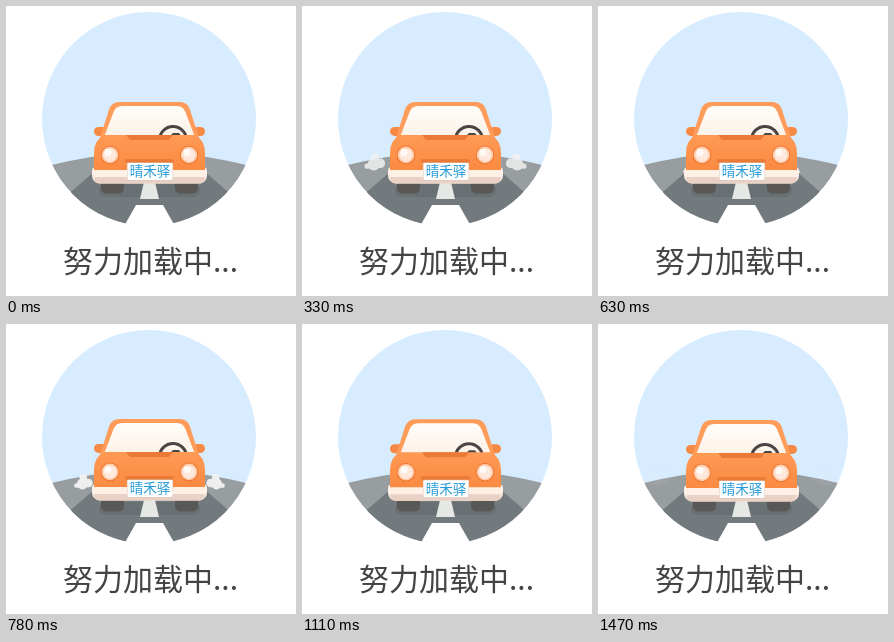
An HTML page with a canvas that plays this animation: 290x290 px, repeating every 1500 ms.

```html
<!DOCTYPE html>
<html lang="zh">
<head>
<meta charset="utf-8">
<style>
html, body { margin: 0; width: 100%; height: 100%; overflow: hidden; background: #fff; }
canvas { display: block; width: 290px; height: 290px; }
</style>
</head>
<body>
<canvas id="stage" width="290" height="290"></canvas>
<script>
const ctx = document.getElementById('stage').getContext('2d');
const TAU = Math.PI * 2;
const LOOP = 1500, PUFF_PERIOD = 500, BOB_PERIOD = 300;
const CENTER = 143.5;
const FONT = '"Noto Sans CJK SC", "Noto Sans CJK", "Noto Sans", sans-serif';

function fillPath(color, trace) {
  ctx.beginPath();
  trace();
  ctx.fillStyle = color;
  ctx.fill();
}

const poly = (color, ...pts) => fillPath(color, () => {
  pts.forEach(([x, y]) => ctx.lineTo(x, y));
  ctx.closePath();
});
const box = (color, x, y, w, h, r) => fillPath(color, () => ctx.roundRect(x, y, w, h, r));
const disc = (color, x, y, rx, ry = rx) => fillPath(color, () => ctx.ellipse(x, y, rx, ry, 0, 0, TAU));

function vertical(y0, y1, top, bottom) {
  const g = ctx.createLinearGradient(0, y0, 0, y1);
  g.addColorStop(0, top);
  g.addColorStop(1, bottom);
  return g;
}

function label(text, x, y, font, color, align) {
  ctx.font = `${font} ${FONT}`;
  ctx.fillStyle = color;
  ctx.textAlign = align;
  ctx.fillText(text, x, y);
}

// Runs a drawing for the left half, then mirrored for the right half.
function bothSides(draw) {
  draw();
  ctx.save();
  ctx.translate(CENTER * 2, 0);
  ctx.scale(-1, 1);
  draw();
  ctx.restore();
}

// Exhaust drifts outward and up, grows and fades.
function puff(phase) {
  const age = phase - 0.46;
  const scale = 0.75 + age;
  const alpha = 1 - (Math.max(0, age) / 0.5) ** 2;
  if (scale <= 0 || alpha <= 0) return;
  ctx.save();
  ctx.globalAlpha = alpha;
  ctx.translate(82 - age * 46, 160 - age * 18);
  ctx.scale(scale, scale);
  fillPath('#f1f1f1', () => {
    for (const [x, y, r] of [[-1, 2, 6.5], [6, 1, 5], [0, -5, 4.5], [-8, 4, 2.8]]) {
      ctx.moveTo(x + r, y);
      ctx.arc(x, y, r, 0, TAU);
    }
  });
  ctx.restore();
}

function scene(phase) {
  ctx.save();
  ctx.beginPath();
  ctx.arc(143, 113, 107, 0, TAU);
  ctx.clip();
  ctx.fillStyle = '#d7ecff';
  ctx.fillRect(30, 0, 230, 225);
  fillPath('#989da0', () => {
    ctx.moveTo(30, 163);
    ctx.quadraticCurveTo(143, 131, 256, 163);
    ctx.lineTo(256, 225);
    ctx.lineTo(30, 225);
  });
  poly('#737a7d', [105, 151], [182, 151], [267, 225], [20, 225]);
  box('#697073', 93, 178, 101, 13, 6);
  poly('#e6e8e6', [138, 176], [149, 176], [153, 193], [134, 193]);
  ctx.restore();
  poly('#fff', [130, 199], [157, 199], [170, 222], [117, 222]);
  bothSides(() => puff(phase));
}

function headlight(x, y) {
  disc('#ec7430', x, y, 9.3);
  disc('#ffcdac', x, y, 8.3);
  disc('#ffe9dc', x, y, 6.5);
  disc('#fffaf6', x - 2, y - 2.5, 3.5);
}

function cabin(color, top, bottom, xTop, xBottom, r) {
  const mirror = x => CENTER * 2 - x;
  fillPath(color, () => {
    ctx.moveTo(xBottom, bottom);
    ctx.lineTo(xTop - r * 0.4, top + r);
    ctx.quadraticCurveTo(xTop, top, xTop + r, top);
    ctx.lineTo(mirror(xTop + r), top);
    ctx.quadraticCurveTo(mirror(xTop), top, mirror(xTop - r * 0.4), top + r);
    ctx.lineTo(mirror(xBottom), bottom);
    ctx.closePath();
  });
}

function body() {
  const right = CENTER * 2;
  fillPath(vertical(129, 164, '#ff9a54', '#fb8a42'), () => {
    ctx.moveTo(98, 129);
    ctx.lineTo(right - 98, 129);
    ctx.quadraticCurveTo(right - 88, 134, right - 88, 147);
    ctx.lineTo(right - 88, 164);
    ctx.lineTo(88, 164);
    ctx.lineTo(88, 147);
    ctx.quadraticCurveTo(88, 134, 98, 129);
  });
}

function car(lift) {
  bothSides(() => box('#595856', 95, 170, 23, 17.5, 5));
  ctx.save();
  ctx.translate(0, -lift);
  bothSides(() => box('#f68a45', 88, 121, 13, 9, 4.5));
  cabin('#ff9c5a', 96, 132, 106, 94, 7);
  cabin(vertical(100, 130, '#fffdfa', '#fdf2e8'), 100, 131, 110, 98, 6);

  ctx.strokeStyle = '#494545';
  ctx.lineWidth = 3;
  ctx.beginPath();
  ctx.arc(167, 134, 13.5, Math.PI, TAU);
  ctx.stroke();
  poly('#494545', [163, 131], [167, 127], [173, 127], [176, 131]);

  box('#fff0e5', 86, 161, 115, 16.5, [4, 4, 8, 8]);
  box('#e9d1c5', 88, 171, 111, 6.5, [2, 2, 7, 7]);
  body();
  poly('#ea7a36', [120, 129], [167, 129], [163, 134], [124, 134]);
  box('#ea7a36', 119, 153, 49, 4, 2);
  headlight(104, 149);
  headlight(183, 149);

  box('#d9c5ba', 121, 156.5, 46, 18, 1);
  box('#fff', 121.5, 157, 45, 17, 1);
  label('晴禾驿', 144, 170.5, '13.5px', '#259bd8', 'center');
  ctx.restore();
}

function frame(now) {
  const t = now % LOOP;
  const lift = 0.6 * (1 - Math.cos(t / BOB_PERIOD * TAU));
  ctx.fillStyle = '#fff';
  ctx.fillRect(0, 0, 290, 290);
  scene(t % PUFF_PERIOD / PUFF_PERIOD);
  car(lift);
  label('努力加载中...', 57, 265.5, '300 30px', '#444', 'left');
  requestAnimationFrame(frame);
}
requestAnimationFrame(frame);
</script>
</body>
</html>
```
